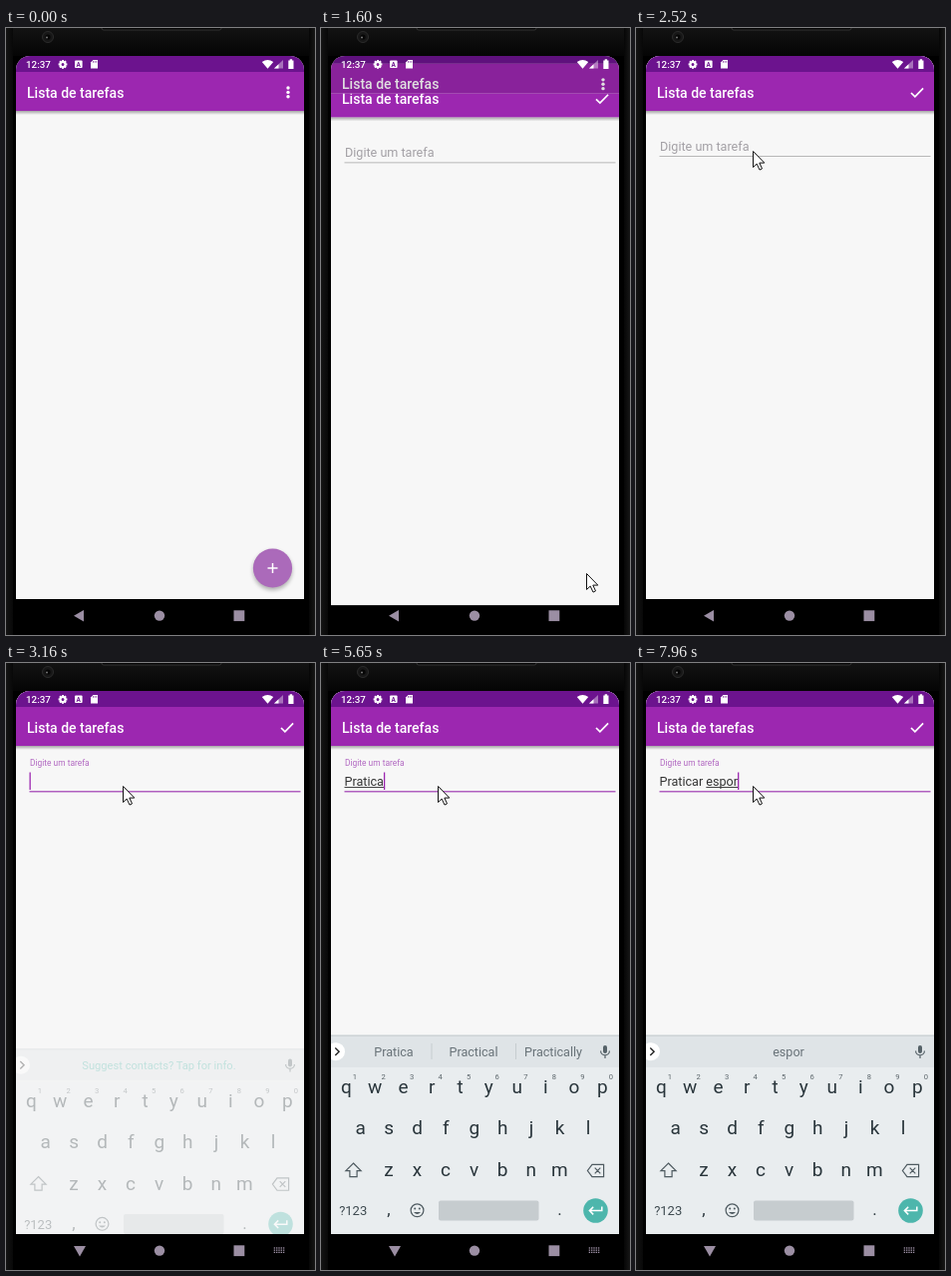
An HTML page for the animation above (8 s loop, 310 by 608 pixels).

```html
<!DOCTYPE html>
<html lang="pt">
<head>
<meta charset="utf-8">
<title>Lista de tarefas</title>
<style>
html, body { margin: 0; width: 100%; height: 100%; overflow: hidden; background: #000; }
svg { display: block; width: 310px; height: 608px; font-family: Roboto, sans-serif; }
text { white-space: pre; }
.mid { text-anchor: middle; }
.line { fill: none; stroke: #4f5b61; stroke-width: 1.2; }
.nav { fill: #9b8ea3; }
</style>
</head>
<body>
<svg id="stage" viewBox="0 0 310 608"></svg>
<script>
const LOOP = 8000;
const KEY_STEP = 28.55;
const INPUT_X = 23.5;

const rect = (x, y, w, h, fill, more = '') =>
  `<rect x="${x}" y="${y}" width="${w}" height="${h}" fill="${fill}" ${more}/>`;
const circle = (x, y, r, fill, more = '') =>
  `<circle cx="${x}" cy="${y}" r="${r}" fill="${fill}" ${more}/>`;
const path = (d, more = '') => `<path d="${d}" ${more}/>`;
const label = (x, y, size, fill, str, more = '') =>
  `<text x="${x}" y="${y}" font-size="${size}" fill="${fill}" ${more}>${str}</text>`;
const stroke = (color, width) => `fill="none" stroke="${color}" stroke-width="${width}"`;

// Page background, status strip, toolbar and its shadow
const page = () =>
  rect(10, 28, 289, 544, '#f7f7f7') +
  rect(10, 572, 289, 60, '#000') +
  rect(10, 83, 289, 4, 'url(#shade)') +
  rect(10, 8, 289, 36, '#6c138e') +
  rect(10, 44, 289, 39, '#9c27b0') +
  label(21, 69.6, 14, '#fff', 'Lista de tarefas', 'font-weight="500"');

const listPage = page() +
  [60, 64.4, 68.8].map(y => circle(283, y, 1.7, '#fff')).join('') +
  circle(267.5, 543.5, 19.5, '#000', 'opacity=".3" filter="url(#soft)"') +
  circle(267.5, 541, 19.6, '#ab6aba', 'id="fab"') +
  path('M262.5 541h10M267.5 536v10', stroke('#fff', 1.5));

const formPage = page() +
  path('M276 65l3.9 3.8 8.2-8.4', stroke('#fff', 1.7)) +
  rect(INPUT_X, 128, 272, 1, '#b8b8b8', 'id="rule"') +
  label(0, 0, 12.6, '#a3a0a5', 'Digite um tarefa', 'id="hint"') +
  label(INPUT_X, 122.8, 12.6, '#333', '', 'id="typed"') +
  rect(0, 124, 0, 1, '#444', 'id="compose"') +
  rect(0, 109.5, 1.3, 17.5, '#9c27b0', 'id="caret"');

function statusBar() {
  let teeth = '';
  for (let i = 0; i < 8; i++)
    teeth += rect(56, 32, 2, 2.5, '#fff', `transform="rotate(${i * 45} 57 36.4)"`);
  return label(20, 40, 9.8, '#fff', '12:37', 'font-weight="500"') + teeth +
    circle(57, 36.4, 2.5, 'none', 'stroke="#fff" stroke-width="2"') +
    rect(69, 32.5, 7.6, 7.6, '#fff', 'rx="1"') +
    label(72.8, 38.7, 6.5, '#6c138e', 'A', 'class="mid" font-weight="700"') +
    path('M85 34.5l2.5-2.5h4.5v8.5h-7z', 'fill="#fff"') +
    path('M87.5 33v1.8M89.1 33v1.8M90.7 33v1.8', stroke('#6c138e', .6)) +
    path('M262.5 40.8L256.8 34Q262.5 29.8 268.2 34z', 'fill="#fff"') +
    path('M278 32v8.6h-9z', 'fill="#fff" opacity=".4"') +
    path('M273.5 36.3v4.3h-4.5z', 'fill="#fff"') +
    path('M283.3 32.4h1.4v-1.2h2.4v1.2h1.4v8.6h-5.2z', 'fill="#fff"');
}

function keyboard() {
  const ink = '#29353b';
  const row = (keys, x, y) => [...keys].map((k, i) =>
    label(x + i * KEY_STEP, y, 19, ink, k, 'class="mid"')).join('');
  const digits = [...'1234567890'].map((d, i) =>
    label(34 + i * KEY_STEP, 417.3, 7.6, '#5c666b', d, 'class="mid"')).join('');
  const words = [73, 153, 233].map((x, i) =>
    label(x, 394, 12.6, '#687278', '', `class="mid" id="word${i}"`)).join('');
  return rect(10, 372.5, 289, 2, '#ccd2d5') +
    rect(10, 374, 289, 31, '#dfe4e7') +
    rect(10, 405, 289, 190, '#e9edef') +
    circle(15, 389.2, 9, '#fff') +
    path('M14.3 385.4l3.8 3.8-3.8 3.8', stroke('#222', 1.4)) +
    label(153.5, 393.6, 11.15, '#52b5a9', 'Suggest contacts? Tap for info.', 'class="mid" id="tip"') +
    words +
    path('M111 381v16M195.5 381v16', 'id="bars" ' + stroke('#c6cdd0', 1)) +
    rect(283, 383, 4, 8, '#566268', 'rx="2"') +
    path('M280.6 388.5a4.4 4.4 0 0 0 8.8 0M285 393v3', stroke('#566268', 1.2)) +
    row('qwertyuiop', 25.5, 431.3) + digits +
    row('asdfghjkl', 39.6, 472.3) + row('zxcvbnm', 68, 514) +
    path('M32.5 501l7.6 7.6h-4v6h-7.2v-6h-4z', 'class="line"') +
    path('M272 502.3h11.6v12.4H272l-4.6-6.2zM274.7 505.6l5.6 5.8M280.3 505.6l-5.6 5.8', 'class="line"') +
    label(32.2, 553, 13, '#3d494f', '?123', 'class="mid"') +
    label(68, 553, 17, ink, ',', 'class="mid"') +
    circle(96.5, 548.3, 6.4, 'none', 'class="line"') +
    circle(94.2, 546.6, 1, '#4f5b61') + circle(98.8, 546.6, 1, '#4f5b61') +
    path('M93 550q3.5 4 7 0z', 'fill="#4f5b61"') +
    rect(118, 538.5, 100.5, 20, '#c6cccf', 'rx="2"') +
    label(239.6, 553, 17, ink, '.', 'class="mid"') +
    circle(275.5, 548.5, 12.3, '#4db6ac') +
    path('M281.8 544.6v4h-12.4M273.2 544.8l-3.8 3.8 3.8 3.8', stroke('#fff', 1.5));
}

function navIcons() {
  let keys = '';
  for (let i = 0; i < 15; i++)
    keys += rect(268.7 + i % 5 * 2.3, 585.3 + Math.floor(i / 5) * 2.2, 1.4, 1.3, '#9b8ea3');
  return path('', 'class="nav" id="back"') + circle(154, 588.6, 5.2, '#9b8ea3') +
    rect(228.5, 583.3, 10.8, 10.8, '#9b8ea3') + `<g id="imeKeys">${keys}</g>`;
}

const body =
  rect(0, 0, 310, 608, '#000') +
  rect(0, 0, 310, 28, 'url(#top)') +
  rect(0, 0, 7, 608, 'url(#left)') +
  rect(304, 0, 6, 608, 'url(#right)') +
  rect(96, -4, 120, 6, '#050505', 'rx="2" stroke="#333" stroke-width="1"') +
  circle(42, 9, 5.5, '#171717', 'stroke="#2b2b2b"') +
  circle(42, 9, 2.6, '#050505') + circle(41, 9.6, 1, '#777');

const fade = (id, dir, from, to) =>
  `<linearGradient id="${id}" ${dir}><stop stop-color="${from}"/><stop offset="1" stop-color="${to}"/></linearGradient>`;

document.getElementById('stage').innerHTML =
  `<defs>
    ${fade('shade', 'x2="0" y2="1"', '#00000055', '#00000000')}
    ${fade('top', 'x2="0" y2="1"', '#131313', '#050505')}
    ${fade('left', '', '#141414', '#080808')}
    ${fade('right', '', '#060606', '#161616')}
    <filter id="soft" x="-30%" y="-30%" width="160%" height="160%"><feGaussianBlur stdDeviation="2"/></filter>
    <clipPath id="screen">${rect(10, 28, 289, 600, '#000', 'rx="14"')}</clipPath>
    <clipPath id="reveal">${rect(10, 28, 289, 580, '#000', 'id="revealBox"')}</clipPath>
    <clipPath id="aboveNav">${rect(10, 28, 289, 544, '#000')}</clipPath>
  </defs>` + body +
  `<g clip-path="url(#screen)">
    <g id="list">${listPage}</g>
    ${rect(10, 28, 289, 580, '#000', 'id="dim"')}
    <g id="formClip" clip-path="url(#reveal)"><g id="form">${formPage}</g></g>
    ${statusBar()}
    <g clip-path="url(#aboveNav)"><g id="ime">${keyboard()}</g></g>
    ${navIcons()}
  </g>` +
  path('M.5 .5v16l3.7-3.4 2.8 6 2.5-1.2-2.7-5.8h5z', 'id="mouse" fill="#fff" stroke="#111"');

const el = {};
document.querySelectorAll('#stage [id]').forEach(n => el[n.id] = n);
const set = (id, attrs) => { for (const k in attrs) el[id].setAttribute(k, attrs[k]); };
const show = (id, on) => set(id, { visibility: on ? 'visible' : 'hidden' });
const move = (id, x, y, s = 1) => set(id, { transform: `translate(${x} ${y}) scale(${s})` });

const pen = document.createElement('canvas').getContext('2d');
const width = str => { pen.font = '12.6px Roboto, sans-serif'; return pen.measureText(str).width; };

const typing = [
  [0, ''], [3940, 'P'], [4410, 'Pra'], [4640, 'Prat'], [5190, 'Prati'], [5490, 'Pratic'],
  [5570, 'Pratica'], [5800, 'Praticar'], [6030, 'Praticar '], [6260, 'Praticar e'],
  [6580, 'Praticar es'], [6810, 'Praticar esp'], [7420, 'Praticar espo'], [7810, 'Praticar espor']
];
const hints = [
  [0, ''], [5260, 'Prati,Practice,Practices'], [5490, 'Pratic,Practice,Practical'],
  [5650, 'Pratica,Practical,Practically'], [5800, ',Praticar,'], [6030, 'and,the,for'],
  [6260, 'e,even,ever'], [6580, 'es,est,else'], [6810, 'esp,est,espy'],
  [6960, 'esp,especial,especially'], [7500, 'espo,expo,exposed'], [7960, ',espor,']
];
const spots = [[0, 269, 576], [200, 269, 572], [430, 268, 560], [500, 266, 546]];

const at = (list, t) => list.filter(row => row[0] <= t).pop();
const part = (t, from, to) => Math.min(1, Math.max(0, (t - from) / (to - from)));
const smooth = u => u * u * (3 - 2 * u);

function drawPages(t) {
  const open = t >= 1510;
  const u = open ? part(t, 1430, 1800) : 0;
  const slide = 1 - (1 - u) ** 2;
  const top = 544 * (1 - u) ** 4.3;
  set('fab', { fill: t < 1210 ? '#ab6aba' : '#824f8e' });
  move('list', 0, -11.5 * slide);
  set('dim', { opacity: t < 1440 ? 0 : open ? .17 * slide : .015 });
  show('formClip', open);
  move('form', 0, 22 * (1 - slide));
  set('revealBox', { y: 28 + top });
}

function drawField(t) {
  const f = smooth(part(t, 2590, 2780));
  const focused = t >= 2610;
  const str = at(typing, t)[1];
  const word = str.split(' ').pop();
  const end = INPUT_X + width(str);
  move('hint', 24, 122.5 - 19.5 * f, 1 - f / 3);
  set('hint', { fill: focused ? '#b269c2' : '#a3a0a5' });
  set('rule', { fill: focused ? '#b061c0' : '#b8b8b8', height: focused ? 1.5 : 1 });
  el.typed.textContent = str;
  set('compose', { x: end - width(word), width: width(word) });
  set('caret', { x: end });
  show('caret', t >= 2780 && t < 3270 || t >= 3770);
}

function drawKeyboard(t) {
  const k = t < 3160 ? 0 : part(t, 3090, 3310);
  const words = at(hints, t)[1].split(',');
  set('ime', { opacity: k });
  move('ime', 0, 20 * (1 - k));
  set('tip', { opacity: t < 5260 ? 1 : 0 });
  set('bars', { opacity: words[0] ? 1 : 0 });
  for (let i = 0; i < 3; i++) el['word' + i].textContent = words[i] || '';
  const down = t >= 2990;
  set('back', { d: down ? 'M68 584h12l-6 10.4z' : 'M68 588.7l10-5.8v11.6z' });
  set('imeKeys', { opacity: down ? 1 : 0 });
}

function drawMouse(t) {
  const [, x, y] = at(spots, t);
  const u = smooth(part(t, 2240, 2520));
  show('mouse', t >= 120);
  move('mouse', x + (117 - x) * u, y + (123 - y) * u);
}

function frame(now) {
  const t = now % LOOP;
  drawPages(t);
  drawField(t);
  drawKeyboard(t);
  drawMouse(t);
  requestAnimationFrame(frame);
}
frame(0);
</script>
</body>
</html>
```
